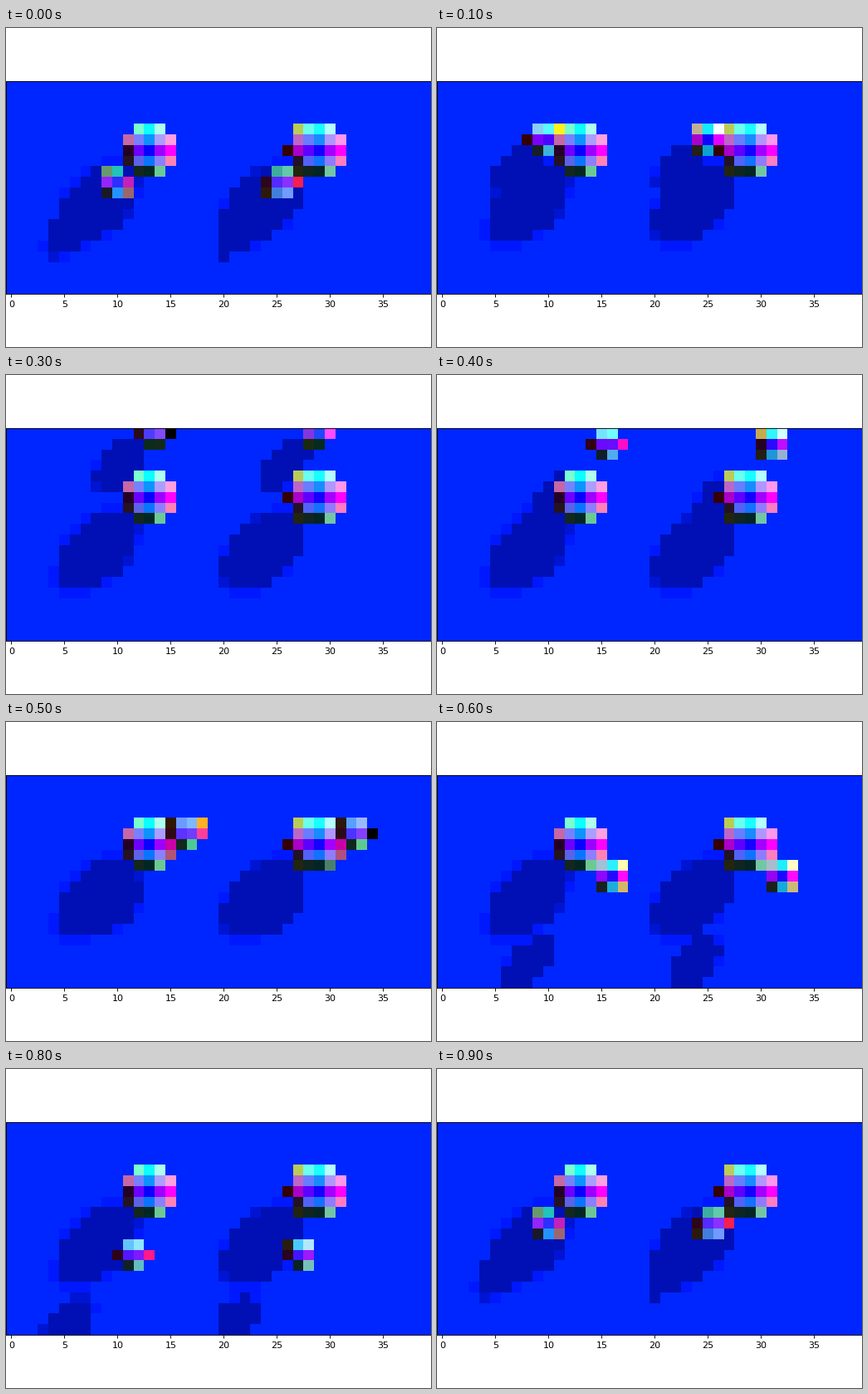
A matplotlib script that plays this animation: 512x384 px, repeating every 1000 ms.

```python
import numpy as np
import matplotlib.pyplot as plt
from matplotlib.animation import FuncAnimation

ROWS, COLS, EYE = 20, 40, 20
STEPS = 9  # the tenth frame closes the orbit on its starting pose

FLOOR = (0, 38, 255)
PENUMBRA = [(1.3, (0, 24, 255)), (1.1, (0, 20, 212)), (1.04, (0, 16, 180))]
LIT_BASE, LIT_SLOPE, AMBIENT = 250, 110, 52
SMALL_R = 1.67

# Per eye: first column, big ball x and radius, orbit x terms, shadow shift.
EYES = [
    (0, 12.92, 2.70, (13.01, -3.21, -1.39), 0.0),
    (EYE, 28.83, 2.84, (28.71, -3.29, -1.754), 15.55),
]
ORBIT_Y = (5.945, 3.255, -5.37)
SHADOW_X = (7.95, -2.4, 1.2)
SHADOW_Y = (11.23, 2.37, -8.26)


def swing(terms, angle):
    mid, c, s = terms
    return mid + c * np.cos(angle) + s * np.sin(angle)


def diagonal(x, y, center):
    """Coordinates along and across the light's direction on screen."""
    dx, dy = x - center[0], y - center[1]
    return (dx - dy) / np.sqrt(2), (dx + dy) / np.sqrt(2)


def ellipse(x, y, center, a, b):
    u, v = diagonal(x, y, center)
    return (u / a) ** 2 + (v / b) ** 2


def draw_ball(image, x, y, center, radius, occluder=None):
    """Colour a ball by its absolute normals, lit from the upper right."""
    nx, ny = (x - center[0]) / radius, (center[1] - y) / radius
    inside = nx ** 2 + ny ** 2 < 1
    nz = np.sqrt(np.clip(1 - nx ** 2 - ny ** 2, 0, 1))
    light = nx + ny + nz
    gain = np.where(light > 0.07, LIT_BASE + LIT_SLOPE * light, AMBIENT)
    if occluder:
        pos, size = occluder
        u, v = diagonal(x, y, pos)
        hidden = (u < 0) & (u > -2.43 * size) & (abs(v) < 0.95 * size)
        gain = np.where(hidden & (nz < 0.7) & (light > 0.07), gain * 0.65, gain)
    gain = np.where(nx * radius > 1.585 * radius / SMALL_R, 0, gain) \
        if radius == SMALL_R else gain
    color = np.abs(np.stack([nx, ny, nz], axis=-1)) * gain[..., None]
    image[inside] = np.clip(color, 0, 255)[inside]


def draw_eye(image, angle, first, big_x, big_r, orbit_x, shift):
    y, x = np.mgrid[0:ROWS, first:first + EYE].astype(float)
    view = image[:, first:first + EYE]
    big = (big_x, 6.0)
    small = (swing(orbit_x, angle), swing(ORBIT_Y, angle))
    small_shadow = (swing(SHADOW_X, angle) + shift, swing(SHADOW_Y, angle))

    shade = np.minimum(ellipse(x, y, (8.15 + shift, 11), 4.6, 2.7),
                       ellipse(x, y, small_shadow, 2.9, 1.65))
    for limit, color in PENUMBRA:
        view[shade < limit] = color

    in_front = np.sin(angle) < 0
    if in_front:
        draw_ball(view, x, y, big, big_r, (small, SMALL_R))
        draw_ball(view, x, y, small, SMALL_R)
    else:
        draw_ball(view, x, y, small, SMALL_R, (big, big_r))
        draw_ball(view, x, y, big, big_r)


def render(step):
    angle = 2 * np.pi * (step % STEPS) / STEPS
    image = np.empty((ROWS, COLS, 3))
    image[:] = FLOOR
    for eye in EYES:
        draw_eye(image, angle, *eye)
    return image.round().astype(np.uint8)


fig = plt.figure(figsize=(6.4, 4.8), dpi=80)
ax = fig.add_axes([0, 0, 1, 1])
picture = ax.imshow(render(0), interpolation="nearest")
ax.set_xticks(range(0, 40, 5))
ax.set_yticks([])


def update(step):
    picture.set_data(render(step))
    return [picture]


anim = FuncAnimation(fig, update, frames=STEPS + 1, interval=100, repeat=True)
plt.show()
```
